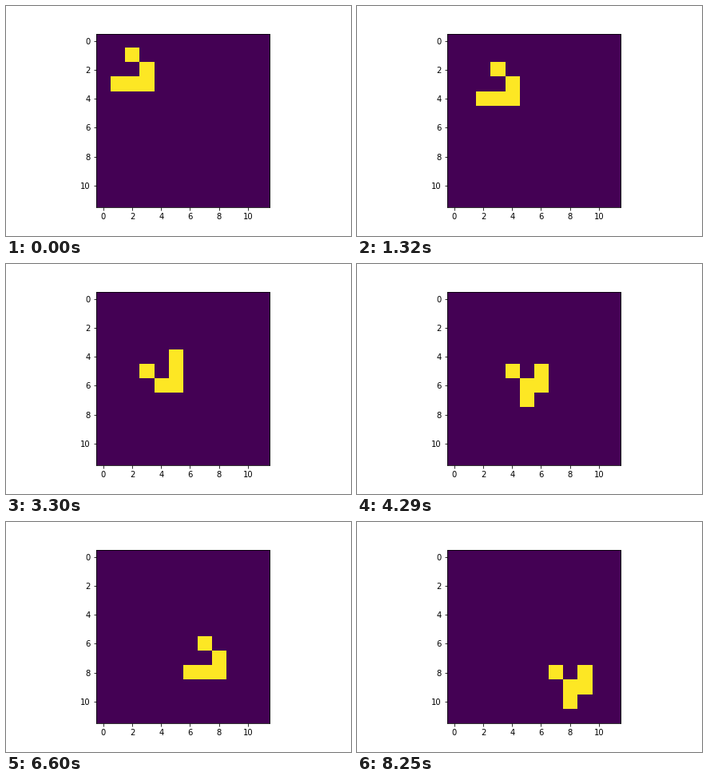
Recreate the animation shown at these times as a matplotlib script. Size 432x288 px, loop 8.58 s.

```python
import numpy as np
import matplotlib.pyplot as plt
from matplotlib.animation import FuncAnimation

SIZE = 12
FRAMES = 26
INTERVAL = 330  # ms


def step(grid):
    """Advance Conway's Game of Life by one generation on a torus."""
    neighbours = sum(
        np.roll(grid, (dy, dx), axis=(0, 1))
        for dy in (-1, 0, 1)
        for dx in (-1, 0, 1)
        if (dy, dx) != (0, 0)
    )
    alive = (neighbours == 3) | ((grid == 1) & (neighbours == 2))
    return alive.astype(int)


def glider_history():
    grid = np.zeros((SIZE, SIZE), dtype=int)
    grid[1:4, 1:4] = [[0, 1, 0], [0, 0, 1], [1, 1, 1]]
    history = [grid]
    while len(history) < FRAMES:
        history.append(step(history[-1]))
    return history


history = glider_history()

fig, ax = plt.subplots(figsize=(6, 4), dpi=72)
fig.subplots_adjust(left=0.125, right=0.9, bottom=0.125, top=0.88)
image = ax.imshow(history[0], cmap="viridis", vmin=0, vmax=1,
                  interpolation="nearest")
ax.set_xticks(range(0, SIZE, 2))
ax.set_yticks(range(0, SIZE, 2))


def draw(frame):
    image.set_data(history[frame])
    return (image,)


anim = FuncAnimation(fig, draw, frames=FRAMES, interval=INTERVAL,
                     repeat=True, repeat_delay=0)
plt.show()
```
